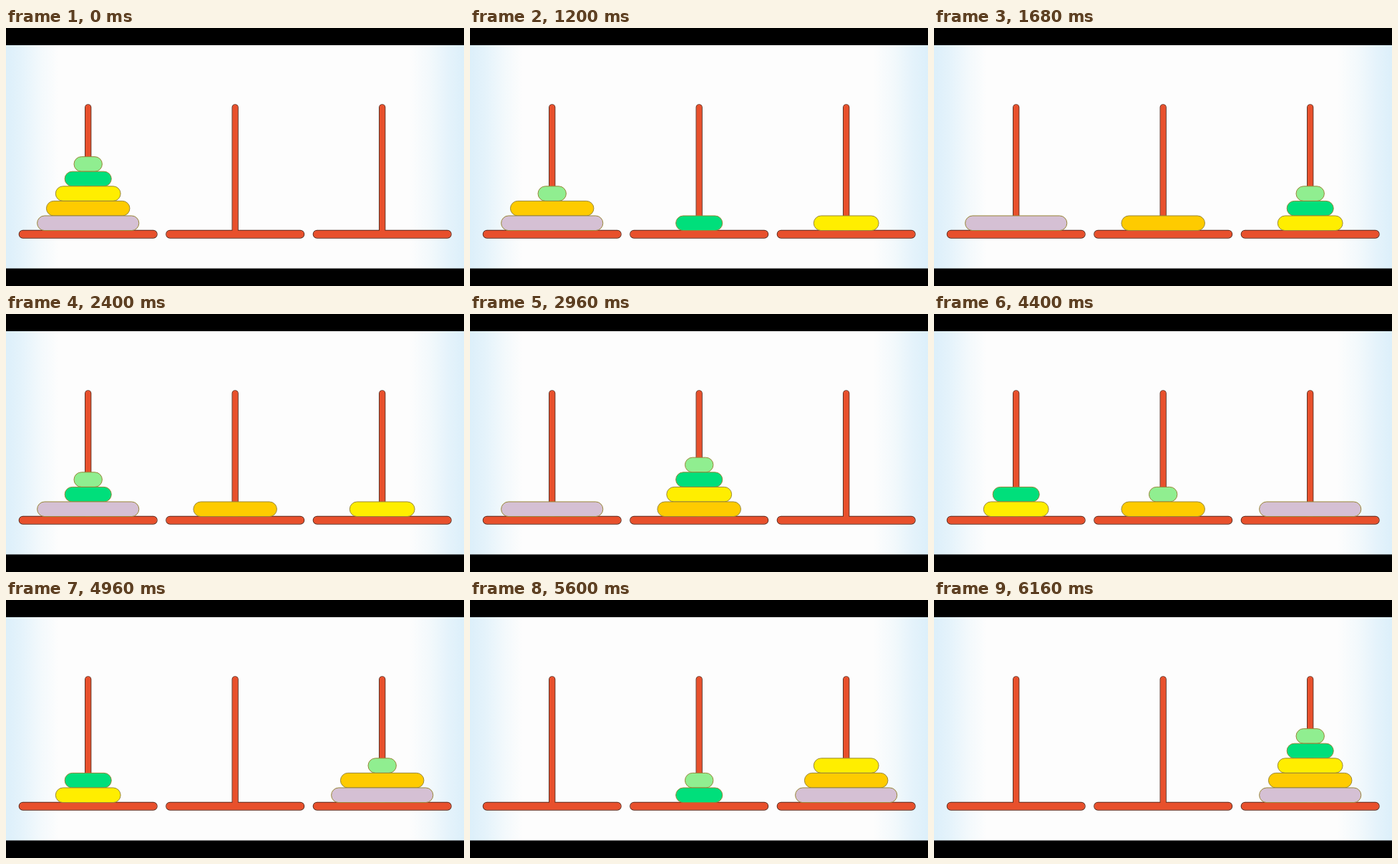
An HTML page that plays this animation: 640x360 px, repeating every 7.44 s.

```html
<!DOCTYPE html>
<html lang="en">
<head>
<meta charset="utf-8">
<title>Tower of Hanoi</title>
<style>
html, body { margin: 0; width: 100%; height: 100%; overflow: hidden; background: #000; }
svg { display: block; width: 100%; height: 100%; }
</style>
</head>
<body>
<svg id="stage" viewBox="0 0 640 360">
  <defs>
    <linearGradient id="sky">
      <stop offset="0" stop-color="#dceffa"/>
      <stop offset=".035" stop-color="#e5f3fb"/>
      <stop offset=".075" stop-color="#f3f9fc"/>
      <stop offset=".115" stop-color="#fdfdfd"/>
      <stop offset=".88" stop-color="#fdfdfd"/>
      <stop offset=".925" stop-color="#f3f9fc"/>
      <stop offset=".965" stop-color="#e5f3fb"/>
      <stop offset="1" stop-color="#dceffa"/>
    </linearGradient>
  </defs>
  <rect width="640" height="360"/>
  <rect y="24" width="640" height="311.5" fill="url(#sky)"/>
</svg>
<script>
const LOOP = 7440, TICK = 80;
const PEG_X = 114.7, PEG_GAP = 205.5, LEVEL = 20.6, FLOOR = 282.6;
const COLORS = ['#90ee90', '#00df7b', '#ffee00', '#fecb00', '#d5c0d4'];
// Tick at which each move lands
const BEATS = [3, 6, 9, 11, 14, 16, 18, 20, 23, 26, 28, 31, 33, 35, 37, 40,
  42, 45, 47, 50, 52, 55, 57, 60, 62, 64, 66, 69, 71, 74, 76];

const stage = document.getElementById('stage');

function bar(x, y, w, h, r, style) {
  const el = document.createElementNS('http://www.w3.org/2000/svg', 'rect');
  const attrs = { x, y, width: w, height: h, rx: r, ...style };
  for (const key in attrs) el.setAttribute(key, attrs[key]);
  stage.appendChild(el);
  return el;
}

// Outline below, fill above, so post and base merge into one shape
function stand(cx) {
  const parts = [[cx - 4, 106.8, 8, 182, 4], [cx - 96.4, 282.4, 192.8, 10.6, 5.3]];
  for (const p of parts) bar(...p, { fill: 'none', stroke: '#592b1e', 'stroke-width': 1.3 });
  for (const [x, y, w, h, r] of parts) {
    bar(x + .3, y + .3, w - .6, h - .6, r - .3, { fill: '#e8502c' });
  }
}

function solve(n, from, to, moves) {
  if (!n) return moves;
  const spare = 3 - from - to;
  solve(n - 1, from, spare, moves);
  moves.push([n - 1, to]);
  return solve(n - 1, spare, to, moves);
}

for (let i = 0; i < 3; i++) stand(PEG_X + i * PEG_GAP);

const moves = solve(COLORS.length, 0, 2, []);
const disks = COLORS.map((fill, i) => {
  const w = 39.4 + i * 25.7;
  return bar(-w / 2, -LEVEL / 2, w, LEVEL, LEVEL / 2,
    { fill, stroke: '#988638', 'stroke-width': 1 });
});

function draw(time) {
  const tick = (time % LOOP) / TICK;
  const pegs = COLORS.map(() => 0);
  moves.forEach(([disk, peg], i) => {
    if (BEATS[i] <= tick) pegs[disk] = peg;
  });
  const heights = [0, 0, 0];
  for (let i = disks.length - 1; i >= 0; i--) {
    const x = PEG_X + pegs[i] * PEG_GAP;
    const y = FLOOR - (heights[pegs[i]]++ + .5) * LEVEL;
    disks[i].setAttribute('transform', `translate(${x} ${y})`);
  }
}

const start = performance.now();
function loop() {
  draw(performance.now() - start);
  requestAnimationFrame(loop);
}
loop();
</script>
</body>
</html>
```
